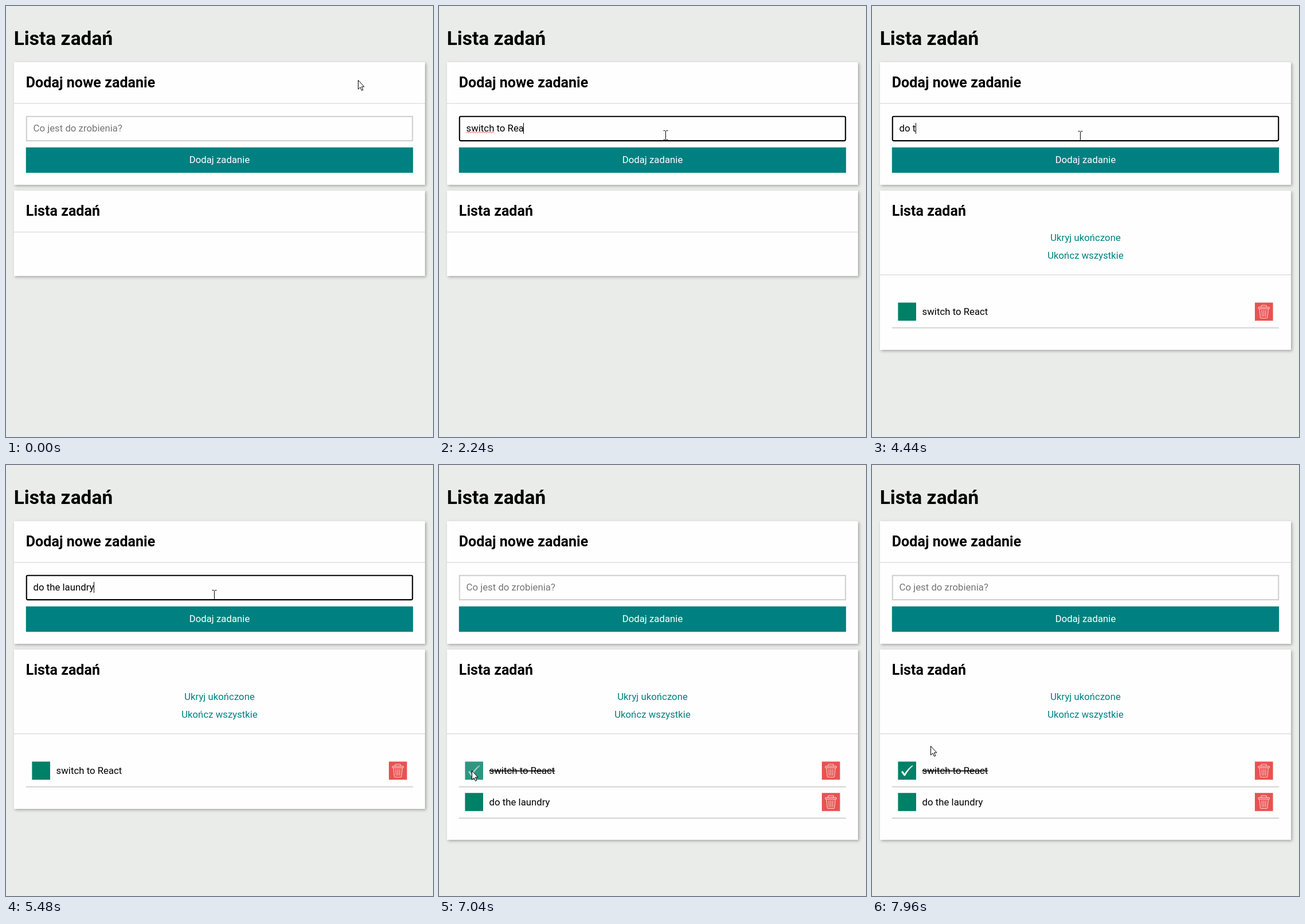
Animation of 745x752 px, one loop 8 s. Source, as an HTML page:

```html
<!DOCTYPE html>
<html lang="pl">
<head>
<meta charset="utf-8">
<title>Lista zadań</title>
<style>
html, body { margin: 0; width: 100%; height: 100%; overflow: hidden; background: #eaece9; }
.card { position: absolute; left: 14px; width: 717px; background: #fefefe; box-shadow: 2px 2px 5px rgba(0, 0, 0, .3); }
svg { position: absolute; left: 0; top: 0; }
text { font: 16.8px Roboto, sans-serif; white-space: pre; }
.h1 { font-size: 33.5px; font-weight: 700; }
.h2 { font-size: 25.1px; font-weight: 700; }
.mid { text-anchor: middle; }
.teal { fill: #008080; }
.rule { fill: #e6e6e6; }
.done text { text-decoration: line-through; }
#field { fill: #fefefe; stroke: #d0d0d0; stroke-width: 2.1; }
#field.focus { stroke: #000; }
</style>
</head>
<body>
<div class="card" style="top:98px;height:214px"></div>
<div class="card" id="list" style="top:322px"></div>
<svg width="745" height="752" viewBox="0 0 745 752">
  <defs>
    <g id="row">
      <g transform="translate(633.2)">
        <rect width="31.6" height="31.6" fill="#e85252"/>
        <g fill="none" stroke="#f6b8b4" stroke-width="1.4" stroke-linecap="round" stroke-linejoin="round">
          <rect x="6" y="8" width="19.500" height="2.800" rx="1.200"/>
          <path d="M11 7.500V6q0-1.400 1.400-1.400h6.500q1.400 0 1.400 1.400v1.500M8 11l1.500 14.500q.2 1.600 1.700 1.600h9q1.500 0 1.700-1.600L23.500 11M12.300 13.500L12.800 24M15.700 13.500V24M19.200 13.500L18.700 24"/>
        </g>
      </g>
      <rect y="43" width="675.4" height="2" fill="#d3d3d3" x="0"/>
    </g>
    <rect id="box" x="10.6" width="31.6" height="31.6" fill="#008066"/>
  </defs>

  <text class="h1" x="13.7" y="68">Lista zadań</text>
  <text class="h2" x="34.8" y="142">Dodaj nowe zadanie</text>
  <rect class="rule" x="14" y="169" width="717" height="2"/>

  <rect id="field" x="35.8" y="192.8" width="673.4" height="42.3"/>
  <text id="hint" x="47.5" y="219" fill="#757575">Co jest do zrobienia?</text>
  <text id="typed" x="47.5" y="219"></text>
  <path id="wave" fill="none" stroke="#e33" stroke-width=".9"/>
  <rect id="caret" y="204" width="1" height="19"/>

  <g id="button">
    <rect class="teal" x="34.8" y="246.7" width="675.4" height="44.3"/>
    <text class="mid" x="372.5" y="274" fill="#fff">Dodaj zadanie</text>
  </g>

  <text class="h2" x="34.8" y="366">Lista zadań</text>
  <rect class="rule" id="rule" x="14" width="717" height="2"/>
  <g id="links" class="mid teal">
    <text x="372.5" y="410">Ukryj ukończone</text>
    <text x="372.5" y="441">Ukończ wszystkie</text>
  </g>

  <g id="first" transform="translate(34.8 517.5)">
    <use href="#row"/>
    <g id="check">
      <use href="#box"/>
      <path id="tick" fill="#fff" d="M16.200 18l2.500-1.800 3.300 4.800q6-9.500 13.700-14.500l.9 1q-8.400 7.500-13.600 17.500h-1.800z"/>
    </g>
    <text x="52.8" y="21.5">switch to React</text>
  </g>
  <g id="second" transform="translate(34.8 572.2)">
    <use href="#row"/>
    <use href="#box"/>
    <text x="52.8" y="21.8">do the laundry</text>
  </g>

  <g id="mouse">
    <circle id="press" r="11.5" fill="#ffeb00" fill-opacity=".55"/>
    <path id="arrow" d="M.5.5V16.200L4.100 12.800L6.500 18.400L8.900 17.300L6.500 11.900H11Z" fill="#fff" stroke="#000"/>
    <path id="beam" d="M-3.500-7.500h3l1 1 1-1h3M.5-6.500v14M-3.500 8.500h3l1-1 1 1h3" fill="none" stroke="#000"/>
  </g>
</svg>
<script>
const LOOP = 8000, STEP = 40, HOLD = 120, BLINK = 320;
const $ = id => document.getElementById(id);
const show = (id, on) => { $(id).style.display = on ? '' : 'none'; };
const clamp = v => Math.max(0, Math.min(1, v));

const FIELD = { x: 35, y: 192, w: 675, h: 44 };
const BUTTON = { x: 35, y: 247, w: 675, h: 44 };
const CHECK = { x: 46, y: 518, w: 31, h: 31 };

const home = { x: 614, y: 129 };
const moves = [
  { at: 250, dur: 190, x: 395, y: 225, bow: 170 },
  { at: 3010, dur: 110, x: 387, y: 254 },
  { at: 3400, dur: 240, x: 363, y: 226 },
  { at: 5930, dur: 200, x: 357, y: 260 },
  { at: 6360, dur: 380, x: 57, y: 533 },
  { at: 7730, dur: 230, x: 102, y: 490 }
];

// Mouse presses, in order
const [focus1, send1, focus2, send2, ticked] = [440, 3160, 3660, 6200, 6860];
const presses = [focus1, send1, focus2, send2, ticked];
const released = (t, press) => t >= press + HOLD;

// Each run of characters is typed at an even pace
const entries = [
  { sent: send1, runs: [['s', 760, 760], ['wit', 920, 1120], ['ch to ', 1280, 1800], ['React', 2000, 2480]] },
  { sent: send2, runs: [['do the ', 4080, 4680], ['laund', 4840, 5200], ['ry', 5440, 5480]] }
];
for (const e of entries) {
  e.keys = e.runs.flatMap(([s, from, to]) =>
    [...s].map((char, i) => ({ char, at: from + (to - from) * i / Math.max(1, s.length - 1) })));
}

$('wave').setAttribute('d', 'M47.500 221.500' + 'l2-2l2 2'.repeat(12));

function mouseAt(t) {
  let p = home;
  for (const m of moves) {
    if (t < m.at) break;
    const u = clamp((t - m.at) / m.dur), e = 1 - (1 - u) ** 2;
    p = {
      x: p.x + (m.x - p.x) * e,
      y: p.y + (m.y - p.y) * e + (m.bow || 0) * Math.sin(Math.PI * e)
    };
  }
  return p;
}

const inside = (p, r) => p.x >= r.x && p.x <= r.x + r.w && p.y >= r.y && p.y <= r.y + r.h;

// Share of the last moments spent over a box: a linear hover transition
function hover(t, box) {
  const n = 4;
  let sum = 0;
  for (let i = 0; i < n; i++) sum += inside(mouseAt(t - i * STEP), box);
  return sum / n;
}

function drawField(t) {
  const entry = entries.find(e => t >= e.keys[0].at && !released(t, e.sent));
  const keys = entry ? entry.keys.filter(k => k.at <= t) : [];
  const text = keys.map(k => k.char).join('');
  const focused = (t >= focus1 && t < send1) || (t >= focus2 && t < send2);
  const typed = $('typed');
  if (typed.textContent !== text) typed.textContent = text;
  show('hint', !text);
  show('wave', focused && text.startsWith('switch '));
  show('caret', focused && (!text || t - keys[keys.length - 1].at < BLINK));
  $('caret').setAttribute('x', Math.floor(47.5 + (text ? typed.getComputedTextLength() : .5)));
  $('field').classList.toggle('focus', focused);
  $('field').setAttribute('rx', focused ? 2 : 0);
  $('button').style.opacity = 1 - .25 * hover(t, BUTTON);
}

function drawList(t) {
  const count = released(t, send1) + released(t, send2), done = released(t, ticked);
  $('list').style.height = (count ? 224 + 54 * count : 149) + 'px';
  $('rule').setAttribute('y', count ? 468 : 393.5);
  show('links', count > 0);
  show('first', count > 0);
  show('second', count > 1);
  show('tick', done);
  $('first').classList.toggle('done', done);
  $('tick').style.opacity = clamp(.5 + (t - ticked - HOLD) / 800);
  $('check').style.opacity = 1 - .18 * hover(t, CHECK);
}

function drawMouse(t) {
  const p = mouseAt(t), overField = inside(p, FIELD);
  $('mouse').setAttribute('transform', `translate(${Math.round(p.x)} ${Math.round(p.y)})`);
  show('beam', overField);
  show('arrow', !overField);
  show('press', presses.some(at => t >= at && !released(t, at)));
}

const start = performance.now();
function frame() {
  const now = (performance.now() - start) % LOOP;
  const t = now - now % STEP;
  drawField(t);
  drawList(t);
  drawMouse(t);
  requestAnimationFrame(frame);
}
frame();
</script>
</body>
</html>
```
